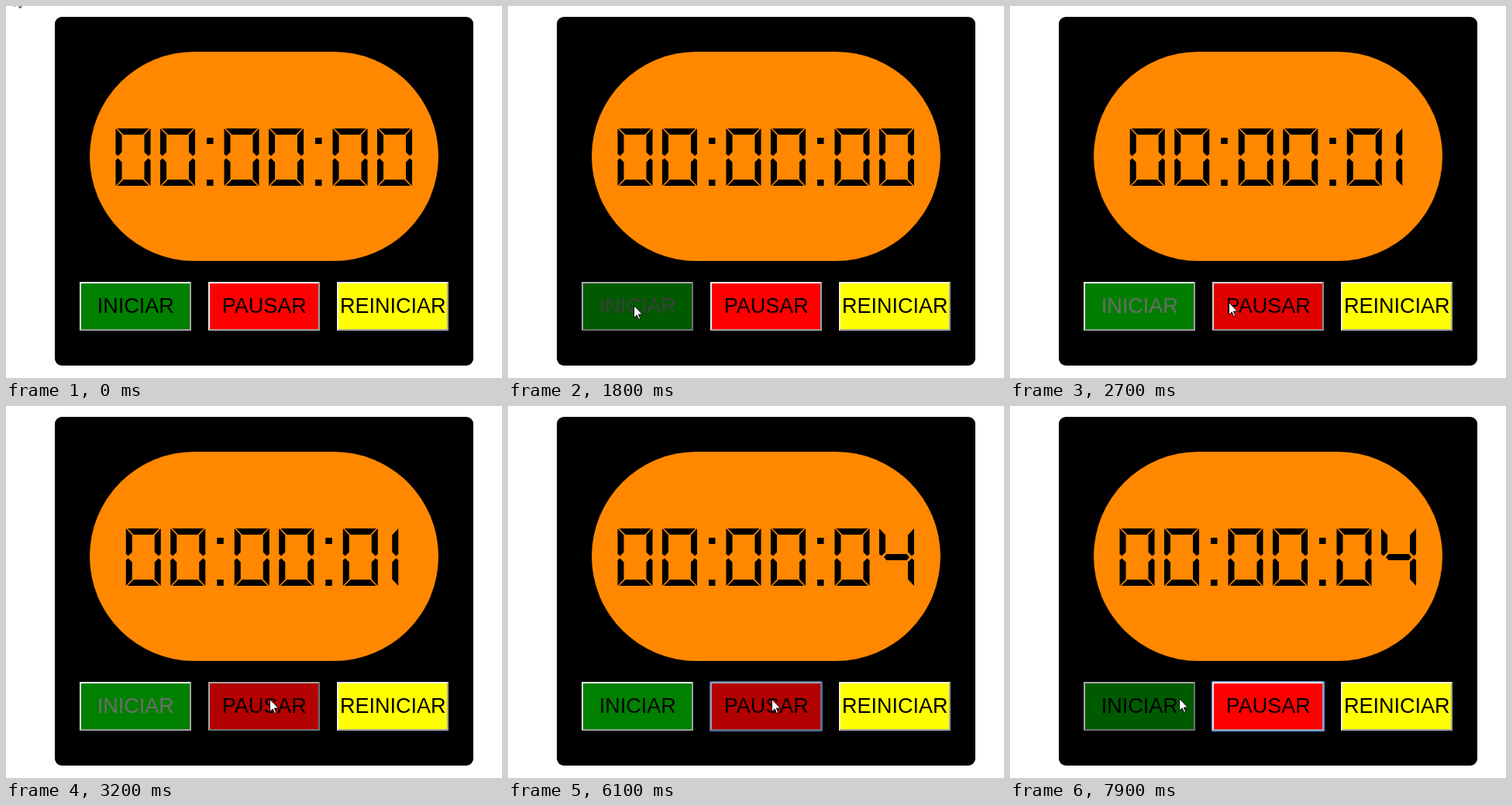
Write an HTML page that moves like this. It is 640 by 480 pixels and loops after 8 s.

```html
<!DOCTYPE html>
<html lang="es">
<head>
<meta charset="utf-8">
<title>Cronómetro</title>
<style>
  html, body { margin: 0; width: 100%; height: 100%; overflow: hidden; background: #fff; }
  svg { display: block; width: 640px; height: 480px; }
  text { font: 27px "Liberation Sans", Arial, sans-serif; text-anchor: middle; }
</style>
</head>
<body>
<svg viewBox="0 0 640 480">
  <rect x="63" y="14" width="540" height="450" rx="9"/>
  <rect x="108" y="59" width="450" height="270" rx="135" fill="#ff8800"/>
  <g id="display"></g>
  <g id="buttons"></g>
  <path id="arrow" d="M.5 .5V16.5L4.2 12.9 6.6 18.5 8.8 17.6 6.4 12H11.5Z" fill="#fff" stroke="#000"/>
  <path id="beam" d="M-3.5-7h3M.5-7h3M0-6.5V6.5M-3.5 7h3M.5 7h3" fill="none" stroke="#d8d8d8"/>
</svg>
<script>
const LOOP = 8000, STEP = 100, FADE = 300;
const $ = id => document.getElementById(id);

function make(parent, tag, attrs) {
  const el = document.createElementNS("http://www.w3.org/2000/svg", tag);
  for (const key in attrs) el.setAttribute(key, attrs[key]);
  return parent.appendChild(el);
}

// Seven-segment glyphs: W x H cell, bars T thick, G apart
const W = 45, H = 74, T = 8, G = 2;
const MID = H / 2;
const poly = pts => "M" + pts.map(p => p.join(" ")).join("L") + "Z";
const flipX = pts => pts.map(([x, y]) => [W - x, y]);
const flipY = pts => pts.map(([x, y]) => [x, H - y]);

const bar = [[G, 0], [W - G, 0], [W - G - T, T], [G + T, T]];
const side = [[0, 0], [T, T + 0.5], [T, MID - 6.5], [3, MID - 1.5], [0, MID - 4]];
const tip = [[9.5, MID + T / 2], [6, MID], [9.5, MID - T / 2]];
const SEGMENTS = {
  a: bar, d: flipY(bar), g: [...tip, ...flipX(tip).reverse()],
  f: side, e: flipY(side), b: flipX(side), c: flipX(flipY(side))
};
const DIGITS = ["abcdef", "bc", "abged", "abgcd", "fgbc"];
const COLON = "M8.5 12h8.5v8h-8.5zM8.5 66h8.5v8h-8.5z";

function glyph(ch) {
  if (ch === ":") return { d: COLON, left: 0, width: 25 };
  const d = [...DIGITS[ch]].map(s => poly(SEGMENTS[s])).join("");
  return ch === "1" ? { d, left: -25, width: 31 } : { d, left: 6, width: 57.5 };
}

let shown = "";
function showTime(label) {
  if (label === shown) return;
  shown = label;
  const glyphs = [...label].map(glyph);
  let x = 333 - glyphs.reduce((sum, g) => sum + g.width, 0) / 2;
  $("display").textContent = "";
  for (const g of glyphs) {
    make($("display"), "path", { d: g.d, transform: `translate(${x + g.left} 158)` });
    x += g.width;
  }
}

// Buttons with an outset border and a focus ring
function makeButton(index, label, fill) {
  const g = make($("buttons"), "g", { transform: `translate(${95 + 166 * index} 356)` });
  make(g, "rect", { width: 144, height: 63, fill });
  const light = make(g, "path", { d: "M0 63V0H144L142 2H2V61Z" });
  const dark = make(g, "path", { d: "M144 0V63H0L2 61H142V2Z" });
  const text = make(g, "text", { x: 72.3, y: 396 - 356 });
  text.textContent = label;
  const ring = make(g, "rect", {
    x: -0.4, y: -0.4, width: 144.8, height: 63.8, rx: 1,
    fill: "none", stroke: "#5b8fea", "stroke-width": 1.3
  });
  return { g, light, dark, text, ring };
}

function drawButton(btn, opacity, grey, focused, pressed) {
  btn.g.setAttribute("opacity", opacity);
  btn.text.setAttribute("fill", `rgb(${grey},${grey},${grey})`);
  btn.light.setAttribute("fill", pressed ? "#a0a0a0" : "#f0f0f0");
  btn.dark.setAttribute("fill", pressed ? "#f0f0f0" : "#a0a0a0");
  btn.ring.style.display = focused ? "" : "none";
}

const [start, pause, reset] = [
  ["INICIAR", "#008000"], ["PAUSAR", "#ff0000"], ["REINICIAR", "#ffff00"]
].map(([label, fill], i) => makeButton(i, label, fill));

const clamp = k => Math.min(1, Math.max(0, k));
const slowDown = k => 1 - (1 - clamp(k)) ** 1.5;
const fadeCurve = k => 1 - (1 - clamp(k)) ** 2.2;

// Value that eases to each [time, value] once its time has come
function transition(t, first, changes) {
  let value = first;
  for (const [at, next] of changes) value += (next - value) * fadeCurve((t - at) / FADE);
  return value;
}

// Pointer strokes: from, to, x, y
const MOVES = [
  [0, 400, 157, 335], [600, 900, 162, 381], [1000, 1200, 162, 386],
  [1900, 2200, 204, 388], [2320, 3200, 340, 378],
  [6400, 7200, 295, 378], [7300, 7900, 218, 377]
];

function pointer(t) {
  let x = 11, y = -16;
  for (const [from, to, toX, toY] of MOVES) {
    const k = slowDown((t - from) / (to - from));
    x += (toX - x) * k;
    y += (toY - y) * k;
  }
  return [Math.round(x), Math.round(y)];
}

function draw(time) {
  const t = Math.floor((time % LOOP) / STEP) * STEP;
  showTime("00:00:0" + Math.min(4, Math.max(0, Math.floor((t - 1640) / 980))));

  const pressed = t >= 1480 && t < 1640;
  drawButton(start,
    transition(t, 1, [[690, 0.7], [2480, 1], [7600, 0.7]]),
    transition(t, 0, [[1640, 109], [5885, 0]]), pressed, pressed);
  drawButton(pause, transition(t, 1, [[2640, 0.7], [7470, 1]]), 0, t >= 5850, false);
  drawButton(reset, 1, 0, false, false);

  const [x, y] = pointer(t);
  const overGap = x > 240 && x < 268;
  $("arrow").style.display = overGap ? "none" : "";
  $("beam").style.display = overGap ? "" : "none";
  $("arrow").setAttribute("transform", `translate(${x} ${y})`);
  $("beam").setAttribute("transform", `translate(${x + 0.5} ${y + 0.5})`);
}

let origin = null;
function frame(now) {
  if (origin === null) origin = now;
  draw(now - origin);
  requestAnimationFrame(frame);
}
draw(0);
requestAnimationFrame(frame);
</script>
</body>
</html>
```
